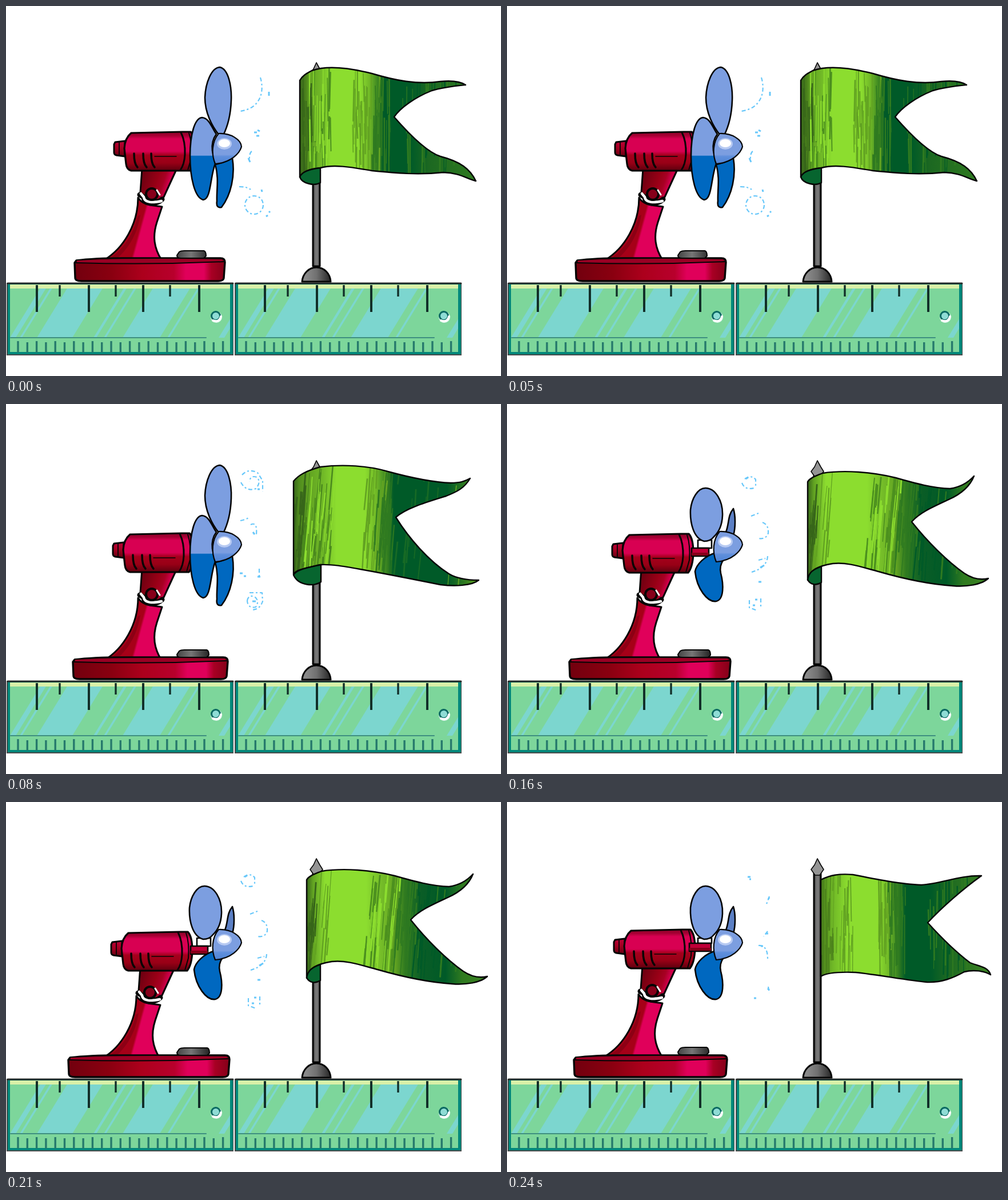
An HTML page for the animation above (320 ms loop, 866 px wide and 647 px high).

```html
<!DOCTYPE html>
<html lang="en">
<head>
<meta charset="utf-8">
<title>Fan and flag</title>
<style>
  html, body { margin: 0; width: 100%; height: 100%; overflow: hidden; background: #fff; }
  svg { display: block; width: 866px; height: 647px; }
</style>
</head>
<body>
<svg id="stage" viewBox="0 0 866 647" fill="none" stroke-linejoin="round" stroke-linecap="round"></svg>
<script>
const STEP = 80;
const BRIGHT = '#8cdd2f', LEAF = '#62a322', MOSS = '#2f7a20', DEEP = '#005a28', EDGE = '#37661a';

function seeded(seed) {
  return () => (seed = (seed * 16807) % 2147483647) / 2147483647;
}
const path = (d, fill = 'none', width = 2.6, stroke = '#050505') =>
  `<path d="${d}" fill="${fill}" stroke="${stroke}" stroke-width="${width}"/>`;
const flat = (d, fill) => `<path d="${d}" fill="${fill}"/>`;
const shift = (x, y, body) => `<g transform="translate(${x} ${y})">${body}</g>`;
const range = (n, draw) => Array.from({ length: n }, (_, i) => draw(i)).join('');
const gradient = (id, stops, x1, y1, x2, y2) =>
  `<linearGradient id="${id}" gradientUnits="userSpaceOnUse" x1="${x1}" y1="${y1}" x2="${x2}" y2="${y2}">` +
  stops.map(([at, color]) => `<stop offset="${at}" stop-color="${color}"/>`).join('') + '</linearGradient>';

const defs = `<defs>
  ${gradient('barrel', [[0, '#8a0028'], [.1, '#a80034'], [.18, '#d80052'], [.5, '#d80052'], [.6, '#a5001c'], [.8, '#980016'], [1, '#5c000e']], 0, 220, 0, 288)}
  ${gradient('knob', [[0, '#c00038'], [.5, '#a00020'], [1, '#640010']], 0, 236, 0, 263)}
  ${gradient('neck', [[0, '#6c0010'], [.5, '#980016'], [.7, '#a80024'], [.85, '#cc0048']], 236, 300, 290, 318)}
  ${gradient('column', [[0, '#a60018'], [.48, '#a60018'], [.54, '#e0005a'], [1, '#e0005a']], 200, 395, 262, 412)}
  ${gradient('pole', [[0, '#333'], [.4, '#777'], [.65, '#777'], [1, '#333']], 536, 0, 550, 0)}
  ${gradient('dome', [[0, '#8a8a8a'], [.45, '#707070'], [1, '#2c2c2c']], 525, 0, 566, 0)}
  ${gradient('button', [[0, '#444'], [.45, '#777'], [1, '#282828']], 299, 0, 354, 0)}
  ${gradient('hub', [[0, '#7c9ee0'], [.7, '#7c9ee0'], [.76, '#5f8fdc'], [1, '#4f84d4']], 0, 222, 0, 276)}
  ${gradient('leftBlade', [[0, '#7c9ee0'], [.49, '#7c9ee0'], [.5, '#0068c0'], [1, '#0068c0']], 0, 195, 0, 330)}
  <clipPath id="glass"><path d="M8 494H392V580H8Z"/></clipPath>
</defs>`;

function ruler(x) {
  const stripe = (at, w) => flat(`M${at} 580l54 -88h${w}l-54 88Z`, '#7cd6cf');
  const tick = (at, y, w = 3.4) => `<path d="M${at} 488V${y}" stroke="#122f29" stroke-width="${w}" stroke-linecap="butt"/>`;
  return shift(x, 0, `
    <path d="M1 484H398V611H1Z" fill="#4a4c4c"/>
    <path d="M3 486H397V609H3Z" fill="#00877a"/>
    <path d="M7 488H392V605H7Z" fill="#7dd69b"/>
    <path d="M7 487H392V494H7Z" fill="#d9f0a8"/>
    <g clip-path="url(#glass)">
      ${[[7, 10], [24, 4], [54, 62], [153, 5], [171, 4], [204, 65], [282, 4], [372, 10]].map(s => stripe(...s)).join('')}
    </g>
    <path d="M3 485H397" stroke="#252a28" stroke-width="3"/>
    ${[54, 145, 240, 338].map(at => tick(at, 535, 4)).join('')}
    ${[94, 192, 287].map(at => tick(at, 508)).join('')}
    <path d="M8 580H350" stroke="#3e8f80" stroke-width="2"/>
    ${range(23, i => `<path d="M${21 + 16.3 * i} ${i % 2 ? 588 : 586}V606" stroke="#26796c" stroke-width="3.4" stroke-linecap="butt"/>`)}
    <circle cx="368" cy="544" r="10" fill="#d8f3eb"/>
    <circle cx="367" cy="542" r="7.5" fill="#8fdcd5" stroke="#0b6962" stroke-width="3"/>
    <path d="M362 550Q373 554 376 543" stroke="#fff" stroke-width="4"/>`);
}

function stand([left, right, top], [buttonEnd, buttonTop], i) {
  const w = right - left;
  const front = `base${i}`;
  return gradient(front, [[0, '#72000e'], [.25, '#8a0010'], [.45, '#ac001c'], [.66, '#b8002c'], [.74, '#e0005a'], [.86, '#e0005a'], [.91, '#a80024'], [1, '#840018']], left, 0, right, 0) +
    path(`M${left + 3} ${top + 5}Q${left + w * .15} ${top} ${left + w * .4} ${top + 1}H${right - 8}Q${right} ${top + 1} ${right} ${top + 8}L${right - 2} 476Q${right - 3} 481 ${right - 12} 481H${left + 12}Q${left + 1} 481 ${left + 1} 475L${left} ${top + 9}Z`, `url(#${front})`, 3.4) +
    flat(`M${left + 4} ${top + 5}Q${left + w / 3} ${top} ${right - 5} ${top + 3}V${top + 7}Q${left + w / 2} ${top + 12} ${left + 4} ${top + 9}Z`, '#9a0024') +
    path(`M${left + 2} ${top + 9}Q${left + w * .5} ${top + 13} ${right - 2} ${top + 7}`, 'none', 2) +
    path(`M303 ${buttonTop + 2}Q306 ${buttonTop} 312 ${buttonTop}H${buttonEnd - 4}Q${buttonEnd} ${buttonTop + 1} ${buttonEnd} ${buttonTop + 9}L${buttonEnd - 4} ${buttonTop + 13}H306Q299 ${buttonTop + 13} 299 ${buttonTop + 8}Z`, 'url(#button)', 2);
}

const column =
  path('M231 335C231 382 205 424 172 444H272C259 423 256 403 264 378L273 351C258 348 240 350 231 335Z', 'url(#column)', 3) +
  flat('M230 368C223 400 204 428 180 442H194C218 420 230 396 235 365Z', '#8d0014') +
  flat('M172 442H272V447H168Z', '#ad0026');

const neck =
  path('M238 284H299L276 334Q266 342 252 339Q238 338 235 326Z', 'url(#neck)', 3) +
  '<path d="M234 330L241 334Q241 343 254 345Q266 345 273 338" stroke="#050505" stroke-width="9"/>' +
  '<path d="M236 328L241 334Q242 342 254 343Q265 343 272 341" stroke="#fff" stroke-width="4.5"/>' +
  '<circle cx="255" cy="329" r="10" fill="#86001a" stroke="#050505" stroke-width="4"/>' +
  '<path d="M264 322L269 330" stroke="#fff" stroke-width="3"/>';

const motor =
  path('M191 238L208 236V263L193 261Q189 260 189 256V242Z', 'url(#knob)', 3) +
  path('M198 238V260', 'none', 1.8) +
  path('M219 222L309 220H323Q331 228 331 254Q330 278 322 288H219Q211 286 210 276L207 249Q208 231 219 222Z', 'url(#barrel)', 3.2) +
  path('M306 221Q314 237 313 260Q312 277 305 287', 'none', 3) +
  path('M320 222Q326 240 324 266L318 287', 'none', 2) +
  [224, 240, 254].map(x => path(`M${x} 258Q${x} 276 ${x + 6} 282`, 'none', 3.5)).join('') +
  path('M260 263H298', 'none', 1.5);

const hub =
  path('M372 223C394 222 411 234 412 246C409 257 394 274 366 276C359 259 360 237 372 223Z', 'url(#hub)', 2.2) +
  '<ellipse cx="382" cy="241" rx="13" ry="10" fill="#b7caf2"/><ellipse cx="382" cy="240" rx="10" ry="7" fill="#fff"/>';

const bladesUp =
  path('M374 107C389 110 395 140 394 165C393 195 386 214 380 226H373C360 210 348 186 348 160C349 135 359 108 374 107Z', '#7c9ee0') +
  path('M343 195C356 196 361 215 368 224Q359 236 361 253L366 276C357 298 359 338 345 339C330 335 322 300 322 262C322 225 330 196 343 195Z', 'url(#leftBlade)') +
  path('M366 277Q383 274 396 266C401 296 394 330 377 352Q367 354 369 341C368 322 373 302 366 277Z', '#0068c0') + hub;

const bladesTurned =
  path('M396 183C400 195 400 216 396 230L383 224C389 208 386 195 396 183Z', '#5b7fc4') +
  path('M347 147C365 147 378 170 377 195Q376 219 362 232Q356 240 345 240C326 235 320 207 321 185C323 165 334 147 347 147Z', '#7c9ee0') +
  path('M366 260C346 265 331 281 329 293C332 322 350 347 366 345C380 342 379 315 374 296Q371 283 379 272Z', '#0068c0') + hub;

const shaft = (x, y, w) =>
  path(`M334 238H358V${y}H334Z`, '#fff') +
  path(`M${x} ${y}h${w}v14h-${w}Z`, '#c00038') +
  flat(`M${x} ${y + 8}h${w}v5h-${w}Z`, '#86001a');

const pole =
  path('M518 482C519 468 530 457 543 457C557 457 567 468 568 482Z', 'url(#dome)', 3) +
  path('M537 125H549V455H537Z', 'url(#pole)', 3) +
  path('M543 99L549 110L554 118L547 128H539L532 118L538 110Z', '#949494', 1.6);

function flag({ shape, fold = '', lean = 0, stops, hatch }, i) {
  const random = seeded(91 + i * 57);
  const streak = (x0, x1, color) => {
    const x = x0 + random() * (x1 - x0);
    const y = 100 + random() * 160;
    const length = 30 + random() * 75;
    const drift = lean * (200 - y);
    return `<path d="M${x + drift} ${y}l${random() * 4 - 2 - lean * length} ${length}" stroke="${color}" stroke-width="${1 + random() * 2}" stroke-linecap="butt"/>`;
  };
  const x0 = stops[0][0], x1 = stops[stops.length - 1][0];
  return gradient(`cloth${i}`, stops.map(([x, c]) => [(x - x0) / (x1 - x0), c]), x0, 0, x1, 0) +
    `<clipPath id="edge${i}"><path d="${shape}"/></clipPath>` +
    flat(shape, `url(#cloth${i})`) +
    `<g clip-path="url(#edge${i})">${hatch.map(([a, b, n, color]) => range(n, () => streak(a, b, color))).join('')}</g>` +
    path(shape, 'none', 2.4) + (fold && path(fold, '#07652f', 2.4));
}

const wind = (arcs, dots) =>
  `<g stroke="#69c8fa" stroke-width="2.2" stroke-linecap="butt"><path d="${arcs}" stroke-dasharray="7 4 3 4"/>` +
  `<path d="${dots}" stroke-width="3"/></g>`;

const poses = [
  {
    base: [120, 383, 440], button: [350, 428], motor: [0, 0], arm: [0, 0], blades: bladesUp,
    wind: wind('M445 125C453 151 444 180 409 184M408 316Q422 316 428 321M450 348A16 16 0 1 1 434 332Q449 333 450 348M430 254Q425 257 426 272',
      'M460 150v7M434 221h5M440 217l4 2M438 227h5M424 266l3 7M455 368l3 -2M460 361l2 -2M447 321l1 4'),
    flag: {
      shape: 'M514 130C520 120 528 117 535 113C560 104 600 108 640 118C680 130 720 138 760 132C780 130 795 132 804 138C785 140 765 142 745 148C715 160 690 178 679 194C700 218 735 255 760 263C795 272 812 285 822 306C805 302 795 292 765 291C720 296 680 292 640 288C610 283 575 276 550 283C530 286 518 290 514 299Z',
      fold: 'M514 299C518 289 531 285 550 283V309C540 315 518 311 514 299Z',
      stops: [[514, EDGE], [525, '#4c831c'], [532, LEAF], [550, '#70b827'], [568, BRIGHT], [620, BRIGHT], [636, '#70b827'], [654, MOSS], [660, DEEP], [708, DEEP], [740, '#1c6821'], [822, MOSS]],
      hatch: [[516, 535, 20, EDGE], [530, 570, 24, '#4c901f'], [530, 568, 16, BRIGHT], [606, 655, 32, LEAF], [640, 672, 28, MOSS], [690, 795, 26, MOSS], [720, 790, 18, DEEP]]
    }
  },
  {
    base: [117, 388, 442], button: [355, 430], motor: [-2, 6], arm: [0, 4], blades: bladesUp,
    wind: wind('M413 124Q424 112 440 120L449 134V153M411 137Q420 154 437 148Q447 137 439 128Q427 124 426 136M410 204Q420 202 426 198M428 211Q440 205 438 228M443 288V304M426 330H448L449 345Q444 360 430 360M422 344Q424 333 435 337Q444 344 437 355Q423 358 422 344',
      'M409 296h5M416 301h4M440 302h5M432 224l3 4M431 345h6M440 149h4'),
    flag: {
      shape: 'M503 135C512 124 525 117 550 110C590 105 635 108 668 118C705 128 745 137 778 138C795 138 803 135 812 130C802 147 790 153 770 161C735 172 700 182 682 198C705 235 740 275 775 297C790 306 810 308 827 308C815 318 785 319 760 316C715 307 665 297 620 289C592 284 570 280 550 281C520 288 507 290 503 298Z',
      fold: 'M503 299C507 290 526 286 551 281V311C541 319 512 319 503 299Z',
      lean: .08,
      stops: [[503, EDGE], [513, '#518d1e'], [530, LEAF], [554, '#70b827'], [578, BRIGHT], [628, BRIGHT], [648, '#70b827'], [669, MOSS], [678, DEEP], [772, DEEP], [802, MOSS], [827, LEAF]],
      hatch: [[504, 525, 20, EDGE], [520, 574, 32, '#4a891e'], [528, 573, 16, BRIGHT], [625, 665, 30, LEAF], [646, 680, 28, MOSS], [680, 760, 14, '#176a25'], [780, 822, 12, LEAF]]
    }
  },
  {
    base: [109, 391, 442], button: [356, 430], motor: [-5, 7], arm: [-3, 4], blades: bladesTurned, shaft: [323, 252, 30],
    wind: wind('M416 131Q428 123 435 132V145M411 138Q416 151 432 147M427 196L440 191M447 207Q458 211 457 226Q453 237 441 235M456 266Q455 286 428 294M440 273L452 270M444 340V357M424 343V356L437 361',
      'M418 131l4 -3M440 311h5M430 352h4M434 342h4M443 286l7 -4'),
    flag: {
      shape: 'M526 136C530 129 540 126 552 121C590 115 640 119 680 129C715 139 745 147 775 148C795 145 808 136 817 126C810 144 795 157 773 167C745 180 722 190 708 206C735 240 770 275 800 296C812 304 825 309 842 305C830 316 805 320 780 318C735 315 695 306 650 293C620 285 595 276 570 279C545 283 530 290 526 308Z',
      fold: 'M526 307C528 295 535 289 550 284V312C541 318 530 316 526 307Z',
      lean: .08,
      stops: [[526, EDGE], [537, LEAF], [549, '#78c12a'], [558, BRIGHT], [630, BRIGHT], [653, '#78c12a'], [681, LEAF], [698, MOSS], [727, '#0a5d26'], [769, DEEP], [798, MOSS], [842, '#3d8422']],
      hatch: [[527, 544, 20, EDGE], [542, 568, 14, LEAF], [630, 690, 36, '#4c901f'], [640, 684, 20, BRIGHT], [684, 728, 30, MOSS], [710, 760, 24, DEEP], [750, 820, 16, MOSS]]
    }
  },
  {
    base: [117, 385, 442], button: [353, 429], motor: [-2, 3], arm: [-1, 1], blades: bladesTurned, shaft: [319, 247, 38],
    wind: wind('M459 165L453 181M456 226L449 235M440 251Q456 250 456 274M457 323L459 334',
      'M421 131h5M424 135h3M457 170l2 -3M453 230h4M432 343h4M456 326l3 3M444 252h4'),
    flag: {
      shape: 'M549 136C565 128 580 125 605 127C640 134 690 144 725 145C760 143 790 128 830 129C800 150 760 185 736 211C755 232 785 262 810 281C825 287 842 288 846 302C835 295 815 293 800 297C780 308 760 316 735 315C700 312 650 302 610 298C585 297 560 298 549 305Z',
      stops: [[549, EDGE], [557, '#5a991f'], [570, '#70b827'], [596, BRIGHT], [650, BRIGHT], [668, '#70b827'], [686, MOSS], [697, DEEP], [742, DEEP], [770, '#1c6821'], [846, '#3d8422']],
      hatch: [[550, 570, 20, '#4c831c'], [568, 606, 22, LEAF], [650, 676, 28, LEAF], [666, 697, 30, MOSS], [735, 830, 28, MOSS], [755, 810, 18, DEEP]]
    }
  }
];

function drawPose(pose, i) {
  const arm = shift(pose.arm[0], pose.arm[1], column + neck);
  return `<g class="pose">${arm}${stand(pose.base, pose.button, i)}
    ${shift(...pose.motor, motor)}${pose.shaft ? shaft(...pose.shaft) : ''}
    ${pose.blades}${pose.wind}${flag(pose.flag, i)}</g>`;
}

const stage = document.getElementById('stage');
stage.innerHTML = defs + ruler(0) + ruler(399) + pole + poses.map(drawPose).join('');

// Each pose holds for one step, with a hard cut to the next.
stage.querySelectorAll('.pose').forEach((group, i) => {
  const keys = poses.map((_, k) => ({ opacity: +(k === i), offset: k / poses.length, easing: 'step-end' }));
  keys.push({ opacity: +(i === 0), offset: 1 });
  group.animate(keys, { duration: STEP * poses.length, iterations: Infinity });
});
</script>
</body>
</html>
```
